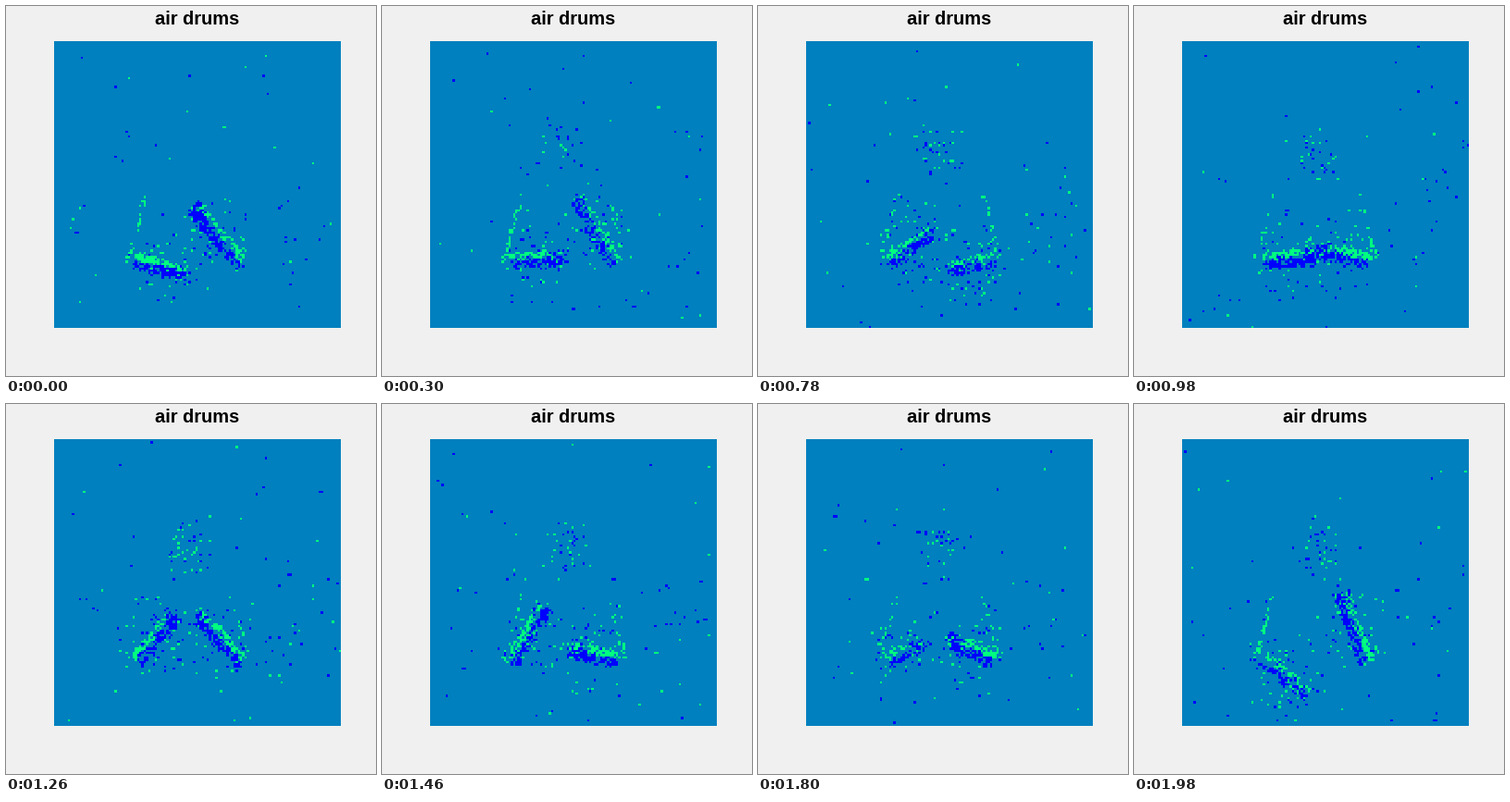
A matplotlib script that plays this animation: 400x400 px, repeating every 2 s.

```python
import numpy as np
import matplotlib.pyplot as plt
from matplotlib.animation import FuncAnimation
from matplotlib.colors import ListedColormap

SIZE, FRAMES, STEP = 400, 100, 20
LEFT, TOP, SIDE, CELLS = 52, 38, 310, 128
DARK, BRIGHT = -1, 1

# Cell centres in stage pixels
axis = (np.arange(CELLS) + 0.5) * SIDE / CELLS
X, Y = np.meshgrid(LEFT + axis, TOP + axis)

# Drumming hands at a few key times: x, y, how much the arm stirs
KEYS = np.array([0, 300, 580, 980, 1260, 1640, 1980])
HANDS = {
    "left": np.array([
        (190, 288, 1), (190, 272, .8), (176, 224, .5), (190, 270, .9),
        (180, 232, .85), (166, 216, .5), (184, 312, .55)]),
    "right": np.array([
        (207, 222, .85), (213, 212, .6), (223, 302, .5), (204, 264, .95),
        (212, 232, .9), (204, 296, .95), (225, 210, .85)]),
}
MIDDLE = 197  # the body's axis
SIGN = {"left": -1, "right": 1}


def at_time(keys, ms):
    """Eased pose between the two surrounding key times."""
    i = min(np.searchsorted(KEYS, ms, side="right") - 1, len(KEYS) - 2)
    u = (ms - KEYS[i]) / (KEYS[i + 1] - KEYS[i])
    u = u * u * (3 - 2 * u)
    return keys[i] * (1 - u) + keys[i + 1] * u


def stroke(grid, rng, start, end, width, d0, d1, value):
    """Ragged line whose density runs from d0 to d1."""
    (x0, y0), (dx, dy) = start, end - start
    u = ((X - x0) * dx + (Y - y0) * dy) / (dx * dx + dy * dy)
    u = np.clip(u, 0, 1)
    dist = np.hypot(X - x0 - u * dx, Y - y0 - u * dy)
    chance = (d0 + (d1 - d0) * u) * np.exp(-(dist / width) ** 4)
    grid[rng.random(grid.shape) < chance] = value


def cloud(grid, rng, x, y, rx, ry, density, dark=0.5):
    """Loose scatter of both kinds of event in an ellipse."""
    r2 = ((X - x) / rx) ** 2 + ((Y - y) / ry) ** 2
    hit = rng.random(grid.shape) < density * np.exp(-r2 ** 2)
    kinds = np.where(rng.random(grid.shape) < dark, DARK, BRIGHT)
    grid[hit] = kinds[hit]


def noise(grid, rng):
    for _ in range(rng.integers(42, 54)):
        row = int(CELLS * rng.random() ** 0.85)
        col = rng.integers(CELLS)
        span = 1 + (rng.random() < 0.06)
        grid[row, col:col + span] = DARK if rng.random() < 0.6 else BRIGHT


def arm(grid, rng, side, ms):
    sign = SIGN[side]
    x, y, stir = at_time(HANDS[side], ms)
    hand = np.array([x, y])
    elbow = np.array([MIDDLE + sign * 54, 276])
    dx, dy = hand - elbow
    up = -sign * np.array([dy, -dx]) / np.hypot(dx, dy)
    if sign < 0:
        up = np.array([dy, -dx]) / np.hypot(dx, dy)
    else:
        up = np.array([-dy, dx]) / np.hypot(dx, dy)

    # Outline of the upper arm shows most while the hand is down
    low = np.clip((y - 230) / 70, 0, 1)
    shoulder = np.array([MIDDLE + sign * 46, 205])
    outer = np.array([MIDDLE + sign * 65, 274])
    stroke(grid, rng, shoulder, outer, 2.5, .35 * low, .2 + .3 * low, BRIGHT)

    # Bright upper edge, dark lower edge, dark fist
    cloud(grid, rng, *(hand + elbow) / 2, 34, 42, .07)
    stroke(grid, rng, elbow + 5 * up, hand + 5 * up, 4.5,
           .85 * stir, .5 * stir, BRIGHT)
    stroke(grid, rng, elbow - 4 * up, hand - 4 * up, 5.5,
           .6 * stir, .95 * stir, DARK)
    cloud(grid, rng, x, y, 10, 10, .5 * stir, .75)


def events(n):
    rng = np.random.default_rng(700 + n)
    ms = n * STEP
    grid = np.zeros((CELLS, CELLS), int)
    noise(grid, rng)
    cloud(grid, rng, 318, 240, 32, 50, .014, .8)
    cloud(grid, rng, MIDDLE, 157, 22, 30, .11 * min(1, ms / 900))
    for side in HANDS:
        arm(grid, rng, side, ms)
    return grid


fig = plt.figure(figsize=(SIZE / 100, SIZE / 100), dpi=100,
                 facecolor="#f0f0f0")
ax = fig.add_axes([LEFT / SIZE, 1 - (TOP + SIDE) / SIZE,
                   SIDE / SIZE, SIDE / SIZE])
ax.axis("off")
fig.text((LEFT + SIDE / 2) / SIZE, 1 - 20 / SIZE, "air drums",
         family="Liberation Sans", weight="bold", size=20 * 0.72,
         ha="center", va="baseline", color="black")

cmap = ListedColormap(["#0000ff", "#0080be", "#00ff80"])
image = ax.imshow(events(0), cmap=cmap, vmin=DARK, vmax=BRIGHT,
                  interpolation="nearest", aspect="auto")


def update(n):
    image.set_data(events(n))
    return [image]


anim = FuncAnimation(fig, update, frames=FRAMES, interval=STEP,
                     repeat=True, repeat_delay=0, blit=False)
plt.show()
```
